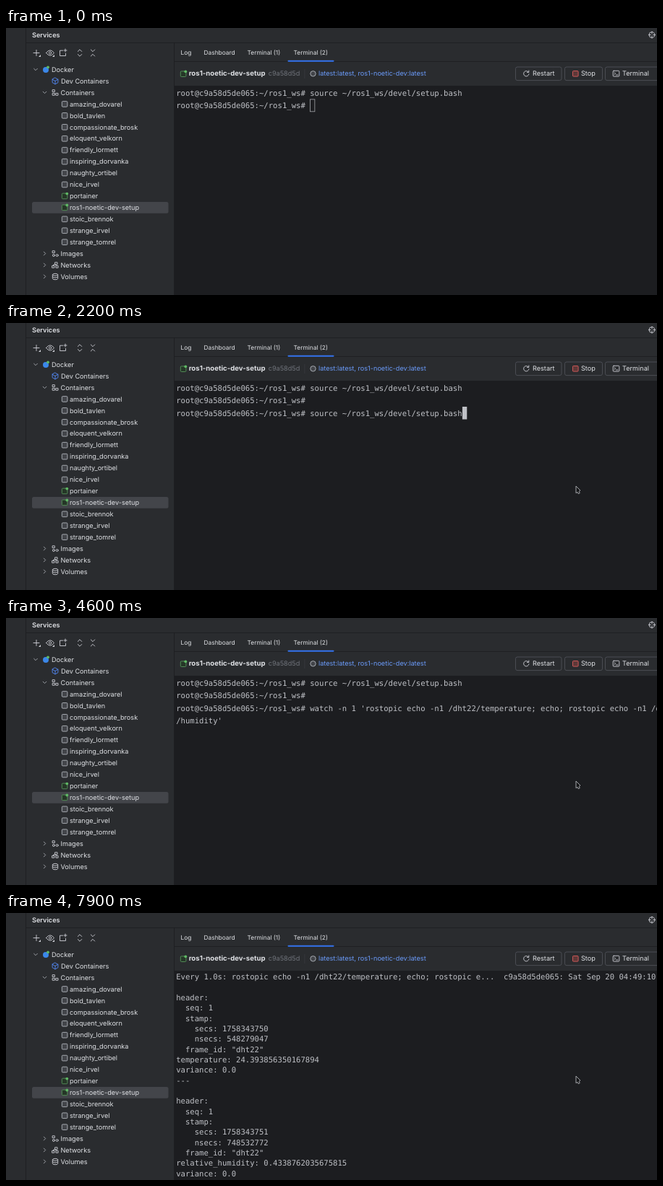
These frames come from a looping animation (900x370 px, 8000 ms). An HTML page:

```html
<!DOCTYPE html>
<html lang="en">
<head>
<meta charset="utf-8">
<title>Services terminal</title>
<style>
  html, body { margin: 0; width: 100%; height: 100%; overflow: hidden; background: #2a2c2f; }
  svg { display: block; width: 900px; height: 370px; }
  text { font-family: Inter, "Noto Sans", sans-serif; font-size: 9.15px; fill: #dfe1e5;
         white-space: pre; text-rendering: geometricPrecision; }
  .tab { font-size: 8.4px; }
  .title { font-weight: 600; }
  .name { font-size: 9.65px; font-weight: 700; }
  .mono { font-family: "DejaVu Sans Mono", "Noto Sans Mono", monospace; font-size: 10.6px; fill: #bfc1c6; }
  .line { fill: none; stroke: #ced0d6; stroke-width: 0.9; stroke-linecap: round; stroke-linejoin: round; }
</style>
</head>
<body>
<svg id="stage" viewBox="0 0 900 370" xmlns="http://www.w3.org/2000/svg"></svg>
<script>
const LOOP = 8000, BLINK = 500;
const ROW_Y = 57.5, ROW_H = 15.94;
const TERM_X = 235.2, CELL_W = 6.382, CELL_H = 17.5, TERM_TOP = 81;
const OUT_H = 14.34;
const stage = document.getElementById("stage");

function add(tag, attrs, parent = stage, content = "") {
  const node = document.createElementNS("http://www.w3.org/2000/svg", tag);
  for (const key in attrs) node.setAttribute(key, attrs[key]);
  node.textContent = content;
  return parent.appendChild(node);
}
const box = (x, y, width, height, fill, more = {}, parent) =>
  add("rect", { x, y, width, height, fill, ...more }, parent);
const label = (x, y, str, more = {}, parent) => add("text", { x, y, ...more }, parent, str);
const line = (d, more = {}, parent) => add("path", { d, class: "line", ...more }, parent);
const dot = (cx, cy, r, fill, more = {}) => add("circle", { cx, cy, r, fill, ...more });
const mono = (y, str, parent) => label(TERM_X, y, str, { class: "mono" }, parent);

function drawPanels() {
  box(0, 0, 900, 370, "#2a2c2f");
  box(233, 80, 667, 290, "#1c1d20");
  box(27, 0, 1, 370, "#1e1f22");
  box(28, 20, 872, 1, "#1f2023");
  box(232, 20, 1, 350, "#1e1f22");
  box(233, 46, 667, 1, "#1f2023");
}

function drawToolbar() {
  label(36, 12.8, "Services", { class: "title" });
  line("M38 34.5h8M42 30.5v8");
  line("M55.5 34.5q5.5-7.5 11 0q-5.5 7.5-11 0Z");
  dot(61, 34.5, 1.7, "none", { class: "line" });
  for (const x of [48, 67]) add("path", { d: `M${x} 37v3h-3Z`, fill: "#ced0d6" });
  line("M78.5 31.2h-4v7.3h8v-3.2M82 29v4M80 31h4");
  line("M99.3 32.5l2.7-2.7 2.7 2.7M99.3 36.5l2.7 2.7 2.7-2.7");
  line("M117.3 30l2.7 2.7 2.7-2.7M117.3 39l2.7-2.7 2.7 2.7");
  dot(893, 9.5, 4, "none", { class: "line" });
  line("M893 5v2.8M893 11.2v2.8M888.5 9.5h2.8M894.7 9.5h2.8");
}

const chevron = (x, y, open) =>
  line(open ? `M${x - 2.4} ${y - 1.2}l2.4 2.4 2.4-2.4` : `M${x - 1.2} ${y - 2.4}l2.4 2.4-2.4 2.4`,
    { style: "stroke:#a8abb2" });

function containerIcon(x, y, running) {
  const stroke = running ? "#57965c" : "#b4b8bf";
  box(x - 3.7, y - 3.7, 7.6, 7.6, running ? "#253627" : "#43454a", { rx: 1.2, stroke, "stroke-width": 0.9 });
  if (running) dot(x + 3.3, y - 3.3, 1.9, "#5fb865");
}

const groupIcons = {
  Containers: (x, y) => line(`M${x - 3.5} ${y - 3.7}h2.8v2.8h-2.8ZM${x - 3.5} ${y + 1}h2.8v2.8h-2.8ZM${x + 1.2} ${y + 1}h2.8v2.8h-2.8Z`),
  Images: (x, y) => {
    line(`M${x - 3.5} ${y - 3.7}h2.8v2.8h-2.8Z`);
    dot(x - 2.1, y + 2.5, 1.5, "none", { class: "line" });
    dot(x + 2.6, y + 2.5, 1.5, "none", { class: "line" });
  },
  Networks: (x, y) => line(`M${x} ${y - 3.7}h3v3h-3ZM${x - 4} ${y + 1}h2.8v2.8h-2.8ZM${x + 1.3} ${y + 1}h2.8v2.8h-2.8ZM${x - 2.6} ${y + 1}v-1.5h4`),
  Volumes: (x, y) => line(`M${x - 3.7} ${y - 2.6}a3.7 1.5 0 0 1 7.4 0v5.4a3.7 1.5 0 0 1-7.4 0Z
    m0 0a3.7 1.5 0 0 0 7.4 0m-7.4 2.7a3.7 1.5 0 0 0 7.4 0`),
};

function drawTree() {
  const rowY = i => ROW_Y + i * ROW_H;
  const rowText = (x, i, str) => label(x, rowY(i) + 3.3, str);
  const containers = ["amazing_dovarel", "bold_tavlen", "compassionate_brosk", "eloquent_velkorn",
    "friendly_lormett", "inspiring_dorvanka", "naughty_ortibel", "nice_irvel", "portainer",
    "ros1-noetic-dev-setup", "stoic_brennok", "strange_irvel", "strange_tomrel"];

  box(36, 241, 188.5, 15.8, "#43454a", { rx: 2.5 });
  chevron(41, ROW_Y, true);
  dot(55, ROW_Y + 0.5, 4, "#3b87e8");
  dot(58, ROW_Y - 3.2, 1.9, "#5fb865");
  rowText(63, 0, "Docker");

  const cubeY = rowY(1);
  line(`M68 ${cubeY - 4.4}l3.9 2.2v4.4l-3.9 2.2-3.9-2.2v-4.4ZM64.1 ${cubeY - 2.2}l3.9 2.2 3.9-2.2M68 ${cubeY}v4.4`,
    { style: "stroke:#548af7" });
  rowText(76, 1, "Dev Containers");

  containers.forEach((name, i) => {
    containerIcon(81, rowY(i + 3), !name.includes("_"));
    rowText(88, i + 3, name);
  });
  const groups = { Containers: 2, Images: 16, Networks: 17, Volumes: 18 };
  for (const [name, i] of Object.entries(groups)) {
    chevron(53.5, rowY(i), name === "Containers");
    groupIcons[name](68, rowY(i));
    rowText(75.5, i, name);
  }
}

function drawHeader() {
  const tabs = { "Log": 241.5, "Dashboard": 273.5, "Terminal (1)": 333.5, "Terminal (2)": 397.5 };
  for (const name in tabs) label(tabs[name], 37.4, name, { class: "tab" });
  box(389.5, 44.8, 64, 2, "#3574f0", { rx: 1 });

  const textY = 66.3;
  containerIcon(245, 63.6, true);
  label(252.7, textY, "ros1-noetic-dev-setup", { class: "name" });
  label(362.7, textY, "c9a58d5d", { style: "fill:#6f737a" });
  box(412.5, 57, 0.8, 13, "#393b40");
  dot(424.5, 63.3, 3.7, "#43454a", { stroke: "#b4b8bf", "stroke-width": 0.9 });
  label(432, textY, "latest:latest, ros1-noetic-dev:latest", { style: "fill:#6b9bfa" });

  const buttons = [[704.5, 63.5, 728, "Restart"], [772.5, 52, 795, "Stop"], [828.5, 80, 852, "Terminal"]];
  for (const [x, width, textX, name] of buttons) {
    box(x, 54, width, 18.6, "none", { rx: 2.5, stroke: "#4e5157", "stroke-width": 0.9 });
    label(textX, textY, name);
  }
  line("M722.3 61a3.7 3.7 0 1 0 .7 2.8M722.8 59v2.4h-2.4");
  box(783.5, 59.5, 7.6, 7.6, "#5e3838", { rx: 1, stroke: "#db5c5c", "stroke-width": 0.9 });
  box(839.2, 59.3, 8.6, 7.8, "none", { rx: 1, class: "line" });
  line("M841 61.6l1.6 1.5-1.6 1.5M843.7 65h2.2");
}

drawPanels();
drawToolbar();
drawTree();
drawHeader();

const PROMPT = "root@c9a58d5de065:~/ros1_ws# ";
const SOURCE = PROMPT + "source ~/ros1_ws/devel/setup.bash";
const WATCH = PROMPT + "watch -n 1 'rostopic echo -n1 /dht22/temperature; echo; rostopic echo -n1 /dht22";
const WATCH_END = "/humidity'";

const message = (secs, nsecs, reading) => ["header:", "  seq: 1", "  stamp:", `    secs: ${secs}`,
  `    nsecs: ${nsecs}`, "  frame_id: \"dht22\"", reading, "variance: 0.0"];
const output = [
  "Every 1.0s: rostopic echo -n1 /dht22/temperature; echo; rostopic e...  c9a58d5de065: Sat Sep 20 04:49:10 2025",
  "",
  ...message(1758343750, 548279047, "temperature: 24.393856350167894"),
  "---",
  "",
  ...message(1758343751, 748532772, "relative_humidity: 0.4338762035675815"),
];

const shell = add("g", {});
const shellLines = [0, 1, 2, 3].map(i => mono(TERM_TOP + 12.7 + i * CELL_H, "", shell));
const caret = box(0, 0, CELL_W, CELL_H, "#bfc1c6", {}, shell);
const outline = box(TERM_X + 29 * CELL_W + 0.2, TERM_TOP + CELL_H + 0.4, CELL_W, CELL_H - 0.6, "none",
  { stroke: "#a4a6ab", "stroke-width": 0.8 }, shell);
const results = add("g", {});
output.forEach((str, i) => mono(92.2 + i * OUT_H, str, results));
const pointer = add("path", { d: "M788 226V235.6L790.2 234.4L791.2 236.6L793.2 235.7L792.3 233.4L794 232Z",
  fill: "#151618", stroke: "#b4b6ba", "stroke-width": 0.9, "stroke-linejoin": "round" });

// Each step: start time, shell lines, caret column and row.
const steps = [
  [0, [SOURCE, PROMPT], 29, 1],
  [700, [SOURCE, PROMPT], 29, 1],
  [1900, [SOURCE, PROMPT, PROMPT], 29, 2],
  [2100, [SOURCE, PROMPT, SOURCE], 62, 2],
  [2800, [SOURCE, PROMPT, WATCH, WATCH_END], 10, 3],
  [3000, [SOURCE, PROMPT, WATCH, WATCH_END], 0, 4],
];
const FOCUS = 700, POINTER_IN = 400, RESULT = 5500;
const show = (node, on) => node.setAttribute("visibility", on ? "visible" : "hidden");

function render(t) {
  const [start, lines, col, row] = steps.findLast(step => step[0] <= t);
  shellLines.forEach((node, i) => {
    const str = lines[i] || "";
    if (node.textContent !== str) node.textContent = str;
  });
  caret.setAttribute("x", TERM_X + col * CELL_W);
  caret.setAttribute("y", TERM_TOP + row * CELL_H);
  const typing = t < RESULT;
  show(shell, typing);
  show(caret, typing && t >= FOCUS && Math.floor((t - start) / BLINK) % 2 === 0);
  show(outline, t < FOCUS);
  show(results, !typing);
  show(pointer, t >= POINTER_IN);
}

function tick() {
  render(performance.now() % LOOP);
  requestAnimationFrame(tick);
}
tick();
</script>
</body>
</html>
```
